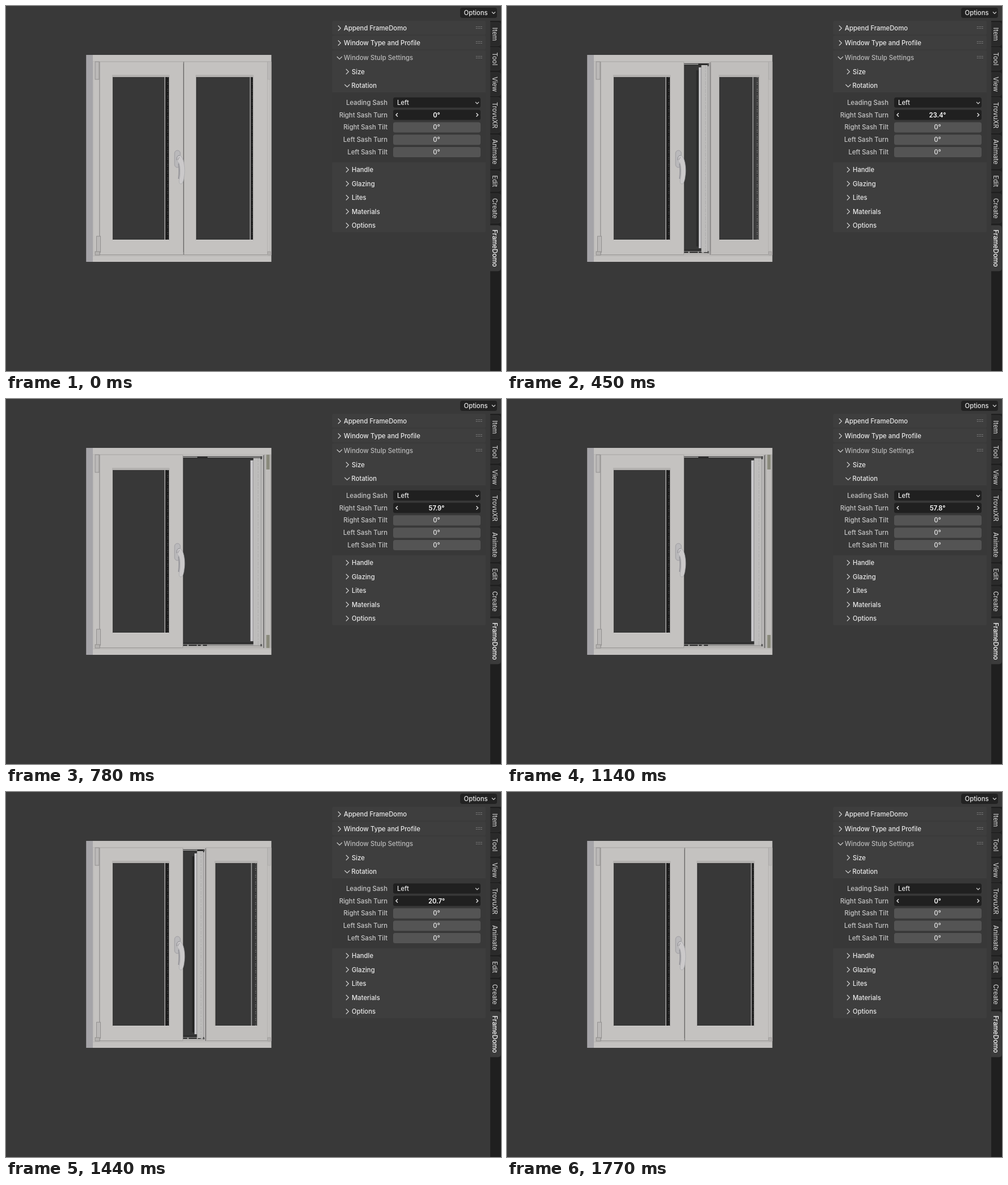
Animation of 872 by 642 pixels, one loop 1.8 s. Source, as an HTML page:

```html
<!DOCTYPE html>
<html lang="en">
<head>
<meta charset="utf-8">
<title>Window sash turn</title>
<style>
  html, body { margin: 0; width: 100%; height: 100%; overflow: hidden; background: #393939; }
  svg { display: block; width: 872px; height: 642px; font: 500 11.3px Inter, "Noto Sans", sans-serif; }
</style>
</head>
<body>
<svg id="stage" viewBox="0 0 872 642" xmlns="http://www.w3.org/2000/svg">
  <g id="frame"></g>
  <g id="rightSash"></g>
  <g id="handle"></g>
  <g id="panel"></g>
</svg>
<script>
const LOOP = 1800, STEP = 30;
const $ = id => document.getElementById(id);
const box = (x0, y0, x1, y1, fill, extra = '') =>
  x1 > x0 ? `<rect x="${x0}" y="${y0}" width="${x1 - x0}" height="${y1 - y0}" fill="${fill}" ${extra}/>` : '';
const line = (d, color, w = 1, extra = '') =>
  `<path d="${d}" fill="none" stroke="${color}" stroke-width="${w}" ${extra}/>`;
const text = (x, y, str, fill, extra = '') =>
  `<text x="${x}" y="${Math.round(y + 4)}" fill="${fill}" ${extra}>${str}</text>`;
const gray = v => `rgb(${v},${v},${v})`;

// ---- Window ----
const DARK = '#383838', FACE = '#c4c2c0';
const TOP = 98, BOTTOM = 438, GLASS_TOP = 125, GLASS_BOTTOM = 411;

// Sash front with a glass opening and the visible right-hand reveal.
function sashFace(x0, x1, g0, g1, reveal, fill = FACE, seal = 27) {
  const r = Math.max(g0, g1 - reveal);
  const thick = g1 - r;
  return box(r, GLASS_TOP, r + 1.4, GLASS_BOTTOM, '#aaa9a9') +
    box(r + 2.4, GLASS_TOP, g1, GLASS_BOTTOM, gray(seal)) +
    line(`M${g1 - thick * .25} ${GLASS_TOP}V${GLASS_BOTTOM}`, gray(seal + 45), thick * .15, 'stroke-dasharray="2 3 1 2 3 1"') +
    `<path d="M${x0} ${TOP}H${x1}V${BOTTOM}H${x0}ZM${g0} ${GLASS_TOP}H${g1}V${GLASS_BOTTOM}H${g0}Z" fill="${fill}" fill-rule="evenodd"/>` +
    box(g0 - 1, 121, g1 + 1, 125, '#b3b1af') +
    box(g0 - 1, GLASS_BOTTOM, g1 + 1, GLASS_BOTTOM + 1, '#d0cecc') +
    line(`M${g0 - .5} 122V412M${g1 + .7} 122V412`, '#b2b0ae') +
    line(`M${x0} ${TOP}H${x1}`, '#acaaa8') +
    line(`M${x0} ${BOTTOM - .5}H${x1}`, '#969492');
}

const hinge = (x, y0, y1) =>
  box(x, y0, x + 7, y1, '#bbb9b8', 'stroke="#92908f" stroke-width="1"');

function drawFrame() {
  $('frame').innerHTML =
    box(141.5, 86, 467.5, 450, FACE) +
    box(141.5, 86, 153, 450, '#a5a4a8') +
    line('M153 97.5H467', '#b8b6b4') +
    line('M153 439.5H467', '#b4b2b0') +
    box(187, 124, 288, 412, DARK) +
    sashFace(165, 312, 188, 287, 8) +
    line('M164.8 98V438', '#969493', 1.4) +
    line('M154 98V438', '#b9b7b6') +
    hinge(157, 98, 129) + hinge(159.5, 405, 433) +
    box(157, 432, 165, 438, '#b5b3b1', 'stroke="#8f8d8c"');
}

function drawHandle() {
  $('handle').innerHTML =
    '<rect x="297" y="254" width="10" height="30" rx="5" fill="#bab9bb" stroke="#9d9ca0"/>' +
    '<path d="M304 277Q306 290 304 304" fill="none" stroke="#96959a" stroke-width="2"/>' +
    '<path d="M301 269C301 262 307 261 309 265C314 270 316 288 314 299C313 308 311 313 308 313C305 313 304.500 309 305.500 304C307.500 294 307 283 304.500 276Q301 274 301 269Z" fill="#cbc9ca" stroke="#a8a7aa" stroke-width=".8"/>' +
    line('M300.500 271Q300 263 306 263M303 271Q303 266 306 267', '#929196');
}

// Oblique view of the turning sash: u runs along its width, v into its thickness.
const HINGE_X = 463, SKEW = .56, WIDTH = 150;

function drawRightSash(deg) {
  const a = deg * Math.PI / 180, c = Math.cos(a), s = Math.sin(a);
  const along = c - SKEW * s, deep = .63 * c + .83 * s;
  const px = (u, v = 0) => HINGE_X - u * along - v * deep;
  const edge = px(WIDTH);
  const side = v => px(WIDTH, v);
  const open = deg > 1;
  let out = box(312, 101, 455, 433, DARK);

  if (open) {
    out += line('M311.5 99V438', '#a2a09f') +
      box(312, 100, 455, 101, '#9a9897') +
      box(312, 101, 455, 102, '#585858') +
      box(312, 102, 455, 103.5, '#a09f9e') +
      box(312, 103.5, 455, 105, '#2b2b2b') +
      line('M337 102.5H355', '#202020', 2) +
      box(312, 428.5, 455, 431, '#2a2a2a') +
      box(312, 431, 455, 432.5, '#8e8d8c') +
      box(312, 432.5, 455, 434.5, '#989796') +
      line('M312 433.3H354', '#1d1d1d', 2, 'stroke-dasharray="7 3 14 2 5 4"') +
      box(312, 434.5, 463, 438, '#b3b1af') +
      box(452, 98, 455, 438, '#777675') +
      box(455, 98, 467, 438, '#bfbdbb') +
      line('M456 98V438M466.5 98V438', '#a09f9e') +
      box(458.5, 98, 464.5, 124, '#8a8a7c') +
      box(458.5, 415, 464.5, 438, '#8a8a7c');
    const seal = Math.max(0, Math.min(1, 2 - deg / 16));
    const sealX = side(28);
    out += box(sealX, 113, sealX + 2 + 3 * Math.min(1, deg / 20), 423, '#202020', `opacity="${seal}"`) +
      (deg < 12 ? box(side(24), 100, side(17), 437, '#bfbdbc') : '') +
      box(side(23), 108, side(18), 426, '#cbcacd') +
      line(`M${side(18.5)} 109V426`, '#8d8c8e') +
      box(side(18), 104, side(2), 433, '#bdbcbb') +
      line(`M${side(10)} 104V433`, '#afaeae', 1, 'stroke-dasharray="7 2 3 2"') +
      line(`M${side(5)} 104V433`, '#959494') +
      box(side(6), 101, side(3.5), 106, '#444') +
      box(side(6), 431, side(3.5), 435, '#555') +
      box(side(3), 98, edge, 438, '#bdbbba') +
      line(`M${side(.8)} 99V438`, '#5c5b5b');
  }

  // Near edge-on the front turns out of sight and bares the frame behind it.
  if (along > .1) {
    const tone = Math.round(194 - Math.min(deg, 45) * .15);
    const sealTone = 27 + Math.round(2.2 * Math.max(0, deg - 8));
    out += sashFace(edge, HINGE_X, px(128), px(28), 12 * deep * (.72 + .28 * Math.min(1, deg / 20)),
      `rgb(${tone + 2},${tone},${tone - 2})`, sealTone) +
      (open ? line(`M${edge + .5} 98V438`, '#a7a5a4') : line('M313 98V438', '#858382', 1.6)) +
      box(463, 98, 467.5, 438, '#c0bebc') +
      line('M460.5 98V438', '#b4b2b0') +
      box(461, 98, 466, 129, '#bcbab9', 'stroke="#aaa8a7" stroke-width=".7"') +
      box(461, 432, 466, 438, '#b5b3b1', 'stroke="#92908f" stroke-width=".7"');
  }
  $('rightSash').innerHTML = out;
}

// ---- Side panel ----
const LIGHT = '#e9e9e9', SOFT = '#c6c6c6';
const chevron = (x, y, down) =>
  line(down ? `M${x - 4.5} ${y - 2}l4.5 4.5 4.5-4.5` : `M${x - 2.5} ${y - 4.5}l4.5 4.5-4.5 4.5`, '#cfcfcf', 1.2);
const grip = y => [0, 3].map(dy =>
  line(`M828 ${y - 2.5 + dy}H839`, '#999', 1.2, 'stroke-dasharray="1.4 1.6"')).join('');

function drawPanel() {
  const ui = [];
  ui.push(box(800, 3, 865, 21, '#222', 'rx="4"'), text(806.5, 12, 'Options', LIGHT),
    line('M856 10.5l3 3 3-3', '#d0d0d0', 1.2));

  ui.push(box(574.5, 26, 845, 50.5, '#3e3e3e', 'rx="3"'),
    box(574.5, 52, 845, 76.5, '#3e3e3e', 'rx="3"'),
    box(574.5, 78, 845, 398, '#3e3e3e', 'rx="3"'),
    box(574.5, 152, 845, 275, '#383838'));
  [['Append FrameDomo', 39], ['Window Type and Profile', 65], ['Window Stulp Settings', 91, true]]
    .forEach(([label, y, down]) =>
      ui.push(chevron(587.5, y, down), text(595, y, label, down ? '#b8b8b8' : LIGHT), grip(y)));
  ui.push(chevron(601.5, 115.5), text(609, 115.5, 'Size', LIGHT),
    chevron(601, 140, true), text(608.5, 140, 'Rotation', LIGHT));
  ['Handle', 'Glazing', 'Lites', 'Materials', 'Options'].forEach((label, i) => {
    const y = 288 + i * 24.5;
    ui.push(chevron(601.5, y), text(609, y, label, LIGHT));
  });

  ['Leading Sash', 'Right Sash Turn', 'Right Sash Tilt', 'Left Sash Turn', 'Left Sash Tilt'].forEach((label, i) => {
    const y = 169.8 + i * 21.8;
    ui.push(text(672, y, label, SOFT, 'text-anchor="end"'),
      box(682, y - 9, 836, y + 9, i < 2 ? '#202020' : '#545454', 'rx="3.5"'));
    if (i === 0) ui.push(text(689, y, 'Left', LIGHT), line(`M827 ${y - 1}l3 3 3-3`, '#ddd', 1.2));
    else ui.push(text(758.5, y, '0°', i === 1 ? '#fff' : LIGHT,
      `text-anchor="middle" ${i === 1 ? 'id="turn" font-weight="600"' : ''}`));
    if (i === 1) ui.push(line(`M690 ${y - 3}l-3 3 3 3M828.5 ${y - 3}l3 3-3 3`, '#eee', 1.4));
  });

  ui.push(box(853, 26, 872, 642, '#1f1f1f'));
  [['Item', 29, 70], ['Tool', 73, 113], ['View', 117, 158], ['TrovuXR', 161, 223], ['Animate', 227, 286],
    ['Edit', 290, 326], ['Create', 330, 382], ['FrameDomo', 386, 466]].forEach(([label, y0, y1], i, all) => {
    const active = i === all.length - 1;
    ui.push(`<path d="M853 ${y0}H867Q871 ${y0} 871 ${y0 + 4}V${y1 - 4}Q871 ${y1} 867 ${y1}H853Z" fill="${active ? '#3b3b3b' : '#2a2a2a'}" stroke="${active ? '#3b3b3b' : '#343434'}" stroke-width=".8"/>`,
      text(0, 0, label, active ? '#fff' : SOFT,
        `text-anchor="middle" transform="translate(861 ${(y0 + y1) / 2}) rotate(90)"`));
  });
  $('panel').innerHTML = ui.join('');
}

// ---- Motion: time in ms, turn in degrees, joined by a monotone cubic ----
const KEYS = [[0, 0], [210, 0], [360, 7.21], [540, 40.8], [780, 57.9], [960, 59], [1140, 57.8], [1440, 20.7], [1600, 0], [LOOP, 0]];
const slope = i => (KEYS[i + 1][1] - KEYS[i][1]) / (KEYS[i + 1][0] - KEYS[i][0]);

function tangent(i) {
  if (i === 0 || i === KEYS.length - 1) return 0;
  const a = slope(i - 1), b = slope(i);
  return a * b > 0 ? 2 * a * b / (a + b) : 0;
}

function turnAt(t) {
  const i = KEYS.findIndex((key, n) => t < KEYS[n + 1][0]);
  const [t0, v0] = KEYS[i], [t1, v1] = KEYS[i + 1];
  const h = t1 - t0, p = (t - t0) / h, q = 1 - p;
  return v0 * q * q * (1 + 2 * p) + v1 * p * p * (3 - 2 * p) +
    h * p * q * (tangent(i) * q - tangent(i + 1) * p);
}

function render(t) {
  const deg = Math.max(0, turnAt(t));
  drawRightSash(deg);
  $('turn').textContent = `${+deg.toPrecision(3)}°`;
}

drawFrame();
drawHandle();
drawPanel();
const start = performance.now();
let shown = -1;
function tick() {
  const t = Math.floor((performance.now() - start) % LOOP / STEP) * STEP;
  if (t !== shown) render(shown = t);
  requestAnimationFrame(tick);
}
tick();
</script>
</body>
</html>
```
